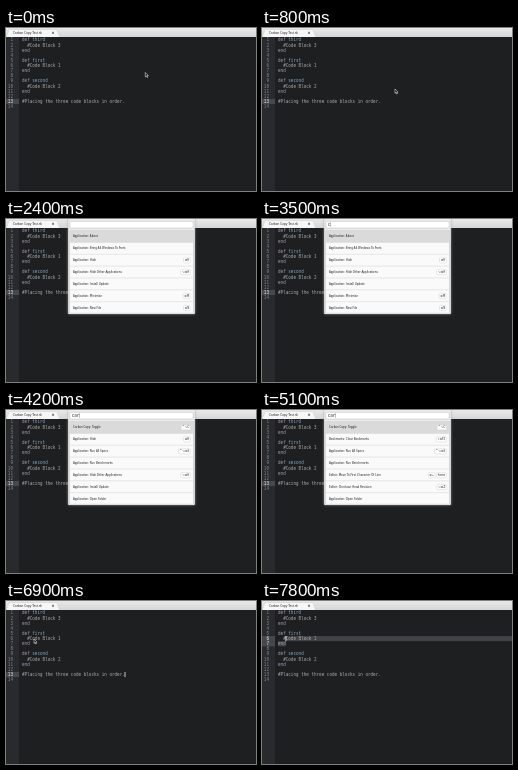
An HTML page with a canvas for the animation above (8000 ms loop, 250 by 163 pixels).

```html
<!DOCTYPE html>
<html lang="en">
<head>
<meta charset="utf-8">
<title>Command palette in a code editor</title>
<style>
html, body { margin: 0; width: 100%; height: 100%; overflow: hidden; background: #1d1f21; }
canvas { display: block; width: 250px; height: 163px; }
</style>
</head>
<body>
<canvas id="stage" width="250" height="163"></canvas>
<script>
const canvas = document.getElementById('stage');
const ratio = window.devicePixelRatio || 1;
canvas.width = Math.round(250 * ratio);
canvas.height = Math.round(163 * ratio);
const ctx = canvas.getContext('2d');

const LOOP = 8000;
const MONO = '"DejaVu Sans Mono", monospace';
const SANS = '"DejaVu Sans", sans-serif';
const CODE_SIZE = 4.27, CHAR = 2.57, CODE_X = 16, TOP = 9.4, PITCH = 5.13, GUTTER = 13;
const KEYWORD = '#b39cc0', NAME = '#8aa8c0', COMMENT = '#aaadaa';

const code = [
  'def third', '  #Code Block 3', 'end', '',
  'def first', '  #Code Block 1', 'end', '',
  'def second', '  #Code Block 2', 'end', '',
  '#Placing the three code blocks in order.', ''
];

const allCommands = [
  ['Application: About'],
  ['Application: Bring All Windows To Front'],
  ['Application: Hide', '⌘H'],
  ['Application: Hide Other Applications', '⌥⌘H'],
  ['Application: Install Update'],
  ['Application: Minimize', '⌘M'],
  ['Application: New File', '⌘N']
];
const caCommands = [
  ['Carbon Copy: Toggle', '^⌥C'],
  ['Application: Hide', '⌘H'],
  ['Application: Run All Specs', '^⌥⌘S'],
  ['Application: Run Benchmarks'],
  ['Application: Hide Other Applications', '⌥⌘H'],
  ['Application: Install Update'],
  ['Application: Open Folder']
];
const carCommands = [
  ['Carbon Copy: Toggle', '^⌥C'],
  ['Bookmarks: Clear Bookmarks', '⇧⌘F2'],
  ['Application: Run All Specs', '^⌥⌘S'],
  ['Application: Run Benchmarks'],
  ['Editor: Move To First Character Of Line', '⌘←', 'home'],
  ['Editor: Checkout Head Revision', '⌥⌘Z'],
  ['Application: Open Folder']
];

// [time, x, y]; no position means hidden
const pointerPath = [
  [0, 139.3, 44.5], [700, 137, 51], [800, 133, 61], [900, 131.3, 66.4], [1700],
  [5900, 61, 56], [6000, 58.4, 54.4], [6200, 52, 55], [6300, 42, 56], [6400, 34.4, 56],
  [6600, 31, 46], [6700, 29.4, 36.5], [6900, 28, 38], [7000, 26.5, 40], [7200]
];
// [time, line, column]; no position means hidden
const caretPath = [
  [0], [1200, 13, 40], [1600], [5900, 13, 40], [6300], [6700, 13, 40],
  [7100, 7, 3], [7500], [7800, 6, 3]
];
const queryPath = [[0, ''], [3500, 'c'], [3900, 'ca'], [4200, 'car']];
const listPath = [[0, allCommands], [3900, caCommands], [4300, carCommands]];
const inputCaretPath = [[0, false], [2800, true], [3200, false], [3500, true], [4700, false], [5100, true]];
const activeLinePath = [[0, 13], [7100, 7], [7800, 6]];

const at = (path, t) => path.filter(step => step[0] <= t).pop().slice(1);
const lineTop = line => TOP + (line - 1) * PITCH;
const colX = col => CODE_X + col * CHAR;

function rect(x, y, w, h, fill) {
  ctx.fillStyle = fill;
  ctx.fillRect(x, y, w, h);
}

function box(x, y, w, h, r, fill, stroke) {
  ctx.beginPath();
  ctx.roundRect(x, y, w, h, r);
  ctx.fillStyle = fill;
  ctx.fill();
  if (stroke) {
    ctx.strokeStyle = stroke;
    ctx.lineWidth = 0.5;
    ctx.stroke();
  }
}

// Set type large and scale down, so small sizes keep exact advances
function text(str, x, y, size, family, fill, align = 'left') {
  ctx.save();
  ctx.translate(x, y);
  ctx.scale(0.1, 0.1);
  ctx.font = `${size * 10}px ${family}`;
  ctx.textAlign = align;
  ctx.fillStyle = fill;
  ctx.fillText(str, 0, 0);
  ctx.restore();
}

function textWidth(str, size, family) {
  ctx.font = `${size * 10}px ${family}`;
  return ctx.measureText(str).width / 10;
}

function drawTabs() {
  const bar = ctx.createLinearGradient(0, 0, 0, 9);
  bar.addColorStop(0, '#e8e8e8');
  bar.addColorStop(1, '#d6d6d6');
  rect(0, 0, 250, 9, bar);
  ctx.beginPath();
  ctx.moveTo(0.5, 9);
  ctx.lineTo(3, 1.5);
  ctx.lineTo(51, 1.5);
  ctx.lineTo(53.5, 9);
  ctx.fillStyle = '#f6f6f6';
  ctx.fill();
  ctx.strokeStyle = '#c4c4c4';
  ctx.lineWidth = 0.4;
  ctx.stroke();
  text('Carbon Copy Test.rb', 7, 6, 2.85, SANS, '#222');
  ctx.beginPath();
  ctx.moveTo(46.2, 4);
  ctx.lineTo(47.8, 5.6);
  ctx.moveTo(47.8, 4);
  ctx.lineTo(46.2, 5.6);
  ctx.strokeStyle = '#333';
  ctx.lineWidth = 0.8;
  ctx.stroke();
}

function drawCodeLine(str, line) {
  const y = lineTop(line) + 4;
  const put = (s, col, fill) => text(s, colX(col), y, CODE_SIZE, MONO, fill);
  if (str.startsWith('def')) {
    put('def', 0, KEYWORD);
    put(str.slice(4), 4, NAME);
  } else if (str === 'end') {
    put(str, 0, KEYWORD);
  } else {
    const col = str.search(/\S|$/);
    put(str.trim(), col, COMMENT);
  }
}

function drawEditor(t) {
  rect(0, 0, 250, 163, '#1d1f21');
  rect(0, 9, GUTTER, 154, '#282a2e');
  const [active] = at(activeLinePath, t);
  const selected = t >= 7800;
  if (selected) {
    rect(colX(3), lineTop(6), 250, PITCH, '#404346');
    rect(colX(0), lineTop(7), 3 * CHAR, PITCH, '#404346');
  }
  code.forEach((str, i) => {
    const line = i + 1;
    const bright = line === active || (selected && line === 7);
    if (bright) rect(0, lineTop(line), GUTTER, PITCH, '#45484c');
    text(String(line), 7, lineTop(line) + 4, CODE_SIZE, MONO, bright ? '#f0f0f0' : '#85888a', 'right');
    drawCodeLine(str, line);
  });
  const [line, col] = at(caretPath, t);
  if (line) rect(colX(col) - 0.2, lineTop(line), 0.8, PITCH, '#f0f0f0');
}

function drawKeys(keys, y) {
  let right = 184.3;
  [...keys].reverse().forEach(key => {
    const w = textWidth(key, 2.6, SANS) + 2.2;
    box(right - w, y - 2.5, w, 5, 0.9, '#fff', '#d0d0d0');
    text(key, right - w / 2, y + 1, 2.6, SANS, '#222', 'center');
    right -= w + 1.5;
  });
}

function drawPalette(t) {
  const left = 62.2, width = 126.6, bottom = 95;
  ctx.save();
  ctx.shadowColor = '#a0a0a0';
  ctx.shadowBlur = 2.5 * ratio;
  box(left, -3, width, bottom + 3, 0.8, '#ececec');
  ctx.restore();
  box(63.8, 2.3, 123.4, 6.8, 1, '#fff', '#b5b5b5');
  const [query] = at(queryPath, t);
  text(query, 65.7, 7, CODE_SIZE, MONO, '#333');
  if (at(inputCaretPath, t)[0]) rect(65.7 + query.length * CHAR, 3.2, 0.4, 4.6, '#555');

  const rowH = 11.93, listX = 63.8, listY = 11.5, listW = 123.4;
  ctx.save();
  ctx.beginPath();
  ctx.rect(listX, listY, listW, 82.6);
  ctx.clip();
  rect(listX, listY, listW, 90, '#fafafa');
  at(listPath, t)[0].forEach(([label, ...keys], i) => {
    const y = listY + i * rowH;
    if (i === 0) rect(listX, y, listW, rowH, '#dadada');
    rect(listX, y + rowH - 0.5, listW, 0.5, '#d0d0d0');
    text(label, 67, y + rowH / 2 + 1, 2.7, SANS, '#222');
    drawKeys(keys, y + rowH / 2);
  });
  ctx.restore();
  ctx.strokeStyle = '#c8c8c8';
  ctx.lineWidth = 0.5;
  ctx.strokeRect(listX, listY, listW, 82.6);
}

function drawPointer(t) {
  const [x, y] = at(pointerPath, t);
  if (x === undefined) return;
  ctx.beginPath();
  ctx.moveTo(x, y);
  [[0, 4.3], [1, 3.4], [1.7, 5], [2.4, 4.7], [1.7, 3.1], [3, 3.1]]
    .forEach(([dx, dy]) => ctx.lineTo(x + dx, y + dy));
  ctx.closePath();
  ctx.fillStyle = '#000';
  ctx.fill();
  ctx.strokeStyle = '#e8e8e8';
  ctx.lineWidth = 0.6;
  ctx.stroke();
}

function frame(now) {
  const t = now % LOOP;
  ctx.setTransform(ratio, 0, 0, ratio, 0, 0);
  drawEditor(t);
  drawTabs();
  if (t >= 2400 && t < 5500) drawPalette(t);
  drawPointer(t);
}

const start = performance.now();
function loop() {
  frame(performance.now() - start);
  requestAnimationFrame(loop);
}
loop();
</script>
</body>
</html>
```
